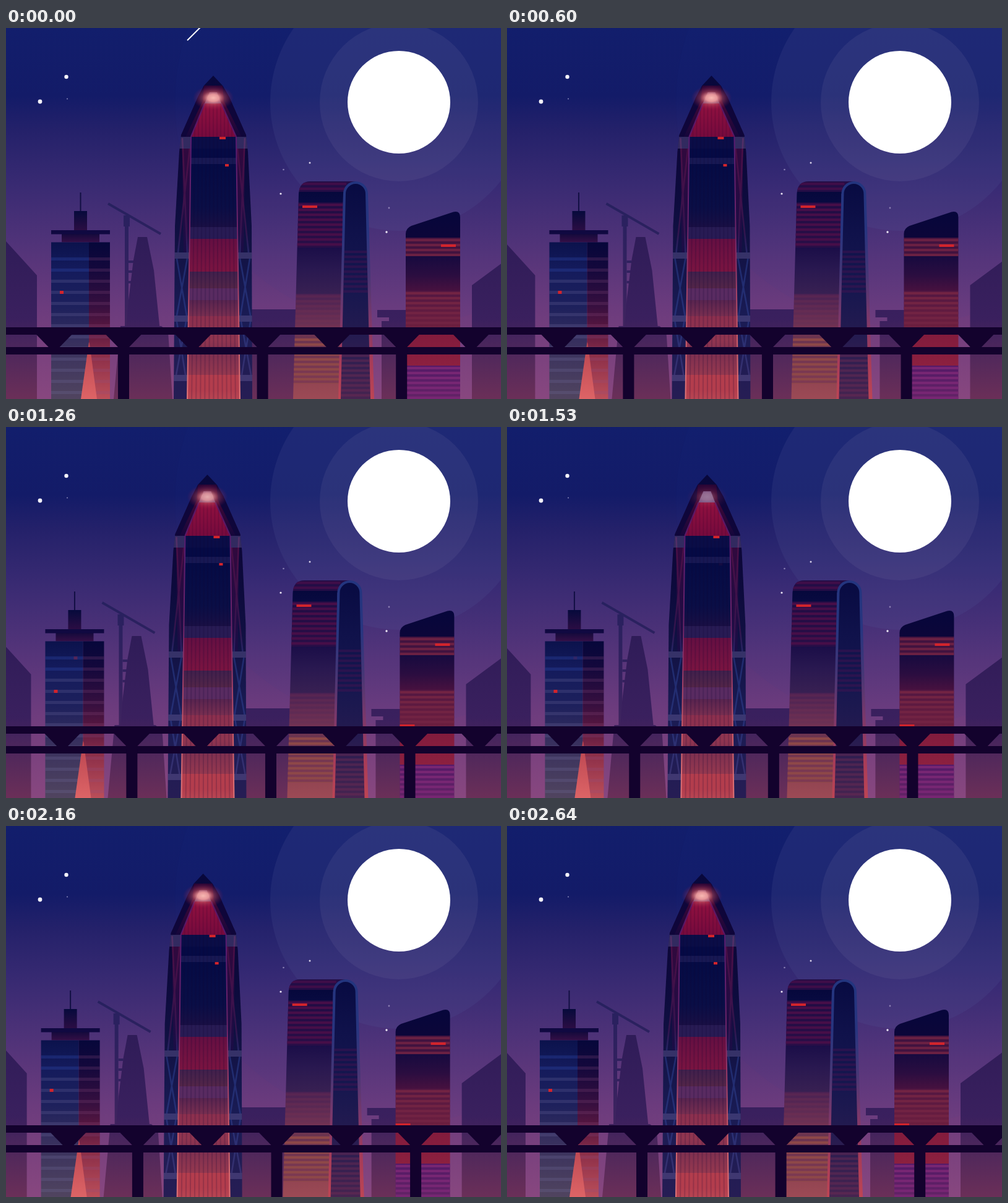
An HTML page with a canvas that plays this animation: 800 px wide and 600 px high, repeating every 2.71 s.

```html
<!DOCTYPE html>
<html lang="en">
<head>
<meta charset="utf-8">
<title>Night skyline</title>
<style>
html, body { margin: 0; width: 100%; height: 100%; overflow: hidden; background: #121d6a; }
canvas { display: block; width: 800px; height: 600px; }
</style>
</head>
<body>
<canvas id="stage" width="800" height="600"></canvas>
<script>
const c = document.getElementById('stage').getContext('2d');
const LOOP = 2710, STEP = 30, LAST = 2640;
const RED = '#d2242c', BRIDGE = '#13022d';

// Vertical gradient from [y, colour] pairs; a repeated y makes a hard edge.
function vg(...s) {
  const y0 = s[0], h = s[s.length - 2] - y0;
  const g = c.createLinearGradient(0, y0, 0, y0 + h);
  for (let i = 0; i < s.length; i += 2) g.addColorStop((s[i] - y0) / h, s[i + 1]);
  return g;
}
function rect(x, y, w, h, fill) {
  c.fillStyle = fill;
  c.fillRect(x, y, w, h);
}
function disc(x, y, r, fill) {
  c.fillStyle = fill;
  c.beginPath();
  c.arc(x, y, r, 0, 7);
  c.fill();
}
function shape(d, fill) {
  c.fillStyle = fill;
  c.fill(new Path2D(d));
}
function line(d, width, stroke) {
  c.lineWidth = width;
  c.strokeStyle = stroke;
  c.stroke(new Path2D(d));
}
function clipped(d, draw) {
  c.save();
  c.clip(new Path2D(d));
  draw();
  c.restore();
}
function stripes(x, w, y0, y1, gap, h, fill) {
  for (let y = y0; y < y1; y += gap) rect(x, y, w, Math.min(h, y1 - y), fill);
}
// Linear interpolation through [time, value] pairs.
function at(t, k) {
  if (t <= k[0]) return k[1];
  for (let i = 2; i < k.length; i += 2)
    if (t < k[i]) return k[i - 1] + (k[i + 1] - k[i - 1]) * (t - k[i - 2]) / (k[i] - k[i - 2]);
  return k[k.length - 1];
}

function sky() {
  rect(0, 0, 800, 600, vg(0, '#121e6c', 110, '#131b68', 165, '#24216a', 250, '#382a72',
    340, '#4e3278', 450, '#6b3b7d', 600, '#88477f'));
  disc(635, 120, 362, 'rgba(40,50,150,.04)');
  disc(635, 120, 208, 'rgba(80,85,150,.19)');
  disc(635, 120, 128, 'rgba(130,125,170,.13)');
  disc(635, 120, 83, '#fff');
  disc(97.5, 79, 3.2, '#f4f2fa');
  disc(55, 119, 3.4, '#f4f2fa');
  disc(99, 114.5, 1.1, '#7f7fb4');
  disc(491, 218, 1.5, '#d8d0e8');
  disc(448.5, 229, 1.3, '#8780b4');
  disc(444, 268, 1.6, '#eee8f6');
  disc(619, 291, 1.4, '#8a7eb2');
  disc(615, 330, 1.7, '#eee8f6');
}

function meteor(t) {
  if (t >= 540) return;
  const head = 21 + 190 * Math.min(1, t / 400), tail = at(t, [0, 0, 120, 0, 540, 211]);
  line(`M${314 - tail} ${tail - 1}L${314 - head} ${head - 1}`, 2, '#fff');
}

function farBlocks() {
  const far = vg(340, '#2f1c58', 470, '#3a205e', 520, '#4d275c', 600, '#6b2f58');
  shape('M-10 334L50 400V600H-10Z', far);
  shape('M753 416L830 359V600H753Z', far);
  shape('M380 455H480V600H380Z', far);
  shape('M600 456H650V600H607V474H619V468H600Z', far);
  const crane = vg(284, '#27215f', 400, '#33215f', 500, '#42255f');
  line('M165 284L250 333', 4, crane);
  rect(190, 303, 10, 18, crane);
  rect(192, 303, 6, 190, crane);
  for (const y of [376, 392, 409]) rect(198, y, 8, 4, crane);
  shape('M213 338H228L239 392L249 490H194L198 440L206 375Z', far);
  shape('M185 482H251L262 491L269 600H174Z', far);
}

function slabTower() {
  rect(119.5, 266, 2, 31, '#120f43');
  rect(110, 296, 21, 31, vg(296, '#060a3c', 327, '#2b0d43'));
  rect(90, 333, 61, 13.5, vg(333, '#140a3c', 346, '#330e45'));
  rect(73, 327, 95, 6.5, '#100941');
  rect(73, 346.5, 61, 254, vg(346, '#0b124c', 390, '#141b5c', 450, '#1d205c', 510, '#38305e', 600, '#50445f'));
  rect(134, 346.5, 34, 254, vg(346, '#06073a', 390, '#14083c', 450, '#370f3f', 490, '#5c1840',
    530, '#8c2f49', 600, '#bb4e59'));
  for (let y = 371; y < 600; y += 18) {
    rect(73, y, 61, 5, y < 400 ? 'rgba(44,66,160,.35)' : 'rgba(120,115,165,.22)');
    rect(134, y, 34, 5, 'rgba(140,80,130,.22)');
  }
  shape('M134 508L121 600H147L135 510Z', vg(508, '#b8434f', 600, '#dd6466'));
}

function cornerTower(t) {
  const body = 'M335 77L350 93L361 112L388 173L391 200L397 320L398 600H271L273 320L280 200L283 173L310 112L320 93Z';
  const core = 'M299 176H372L378 600H293Z';
  shape(body, vg(77, '#08083c', 176, '#0d0637', 260, '#0c0a3c', 360, '#121244', 460, '#191b54', 600, '#261d54'));
  clipped(body, () => {
    // crown
    shape('M320 93H350L360 116L388 176H283L310 116Z', vg(93, '#260535', 125, '#3c0736', 176, '#14073c'));
    shape('M320 93L310 112L283 173V176H290L318 118Z', '#0f063a');
    shape('M350 93L361 112L388 173V176H381L352 118Z', '#0f063a');
    shape('M321 122H348L372 176H299Z', vg(122, '#91103f', 176, '#760a3d'));
    line('M321 122L299 176M348 122L372 176', 2, '#5b1868');
    shape('M329 104H341L348 122H321Z', '#6d578c');
    // side bays
    shape('M285 195H299L294 363H287Z', vg(195, '#30093e', 363, '#1a0d46'));
    shape('M372 195H386L384 363H377Z', vg(195, '#30093e', 363, '#1a0d46'));
    const brace = vg(176, '#5b1148', 330, '#431753', 375, '#263782', 480, '#2d3a86', 600, '#4b3a78');
    c.globalAlpha = .65;
    line('M285 178L293 363M297 195L278 363M276 373L292 465M293 373L276 465M276 475L290 561M291 475L275 561', 2.6, brace);
    line('M386 178L378 363M374 195L392 363M394 373L379 465M378 373L395 465M395 475L381 561M380 475L396 561', 2.6, brace);
    c.globalAlpha = 1;
    for (const [y, h] of [[176, 19], [363, 10], [465, 10], [561, 10]])
      rect(268, y, 134, h, 'rgba(112,100,160,.38)');
  });
  shape(core, vg(176, '#0a0d47', 195, '#0a0d47', 195, '#050a45', 210, '#050a45', 210, '#171853',
    220, '#171853', 220, '#050b45', 290, '#0a0e46', 322, '#190f44', 322, '#281b54', 341, '#281b54',
    341, '#650f42', 394, '#7a1441', 394, '#40204c', 421, '#532548', 421, '#592b61', 440, '#592b61',
    440, '#58244f', 466, '#782e50', 466, '#8c2f4e', 505, '#903550', 528, '#7f3050',
    561, '#95384f', 561, '#b33d4d', 585, '#b33d4d', 600, '#b84553'));
  let pins = '';
  for (let i = 1; i < 12; i++) pins += `M${299 + 73 * i / 12} 176L${293 + 85 * i / 12} 600`;
  line(pins, 2, 'rgba(20,8,50,.18)');
  clipped('M321 122H348L372 176H299Z', () => {
    let p = '';
    for (let x = 305; x < 372; x += 6) p += `M${x} 122V176`;
    line(p, 1.6, 'rgba(50,0,45,.22)');
  });
  line('M299 176L293 600M372 176L378 600', 2,
    vg(176, '#561a70', 330, '#702468', 420, '#a04066', 490, '#c85a66', 600, '#e07476'));

  // beacon
  c.save();
  c.globalAlpha = at(t, [1200, 1, 1500, .32, 1560, .32, 1920, 1]);
  c.translate(335, 113);
  c.scale(1, .62);
  const g = c.createRadialGradient(0, 0, 0, 0, 0, 33);
  g.addColorStop(0, '#f8b8b2');
  g.addColorStop(.28, 'rgba(240,155,155,.92)');
  g.addColorStop(.55, 'rgba(195,80,95,.5)');
  g.addColorStop(1, 'rgba(150,20,70,0)');
  disc(0, 0, 33, g);
  c.restore();
}

function archTower() {
  const block = 'M473 268Q474 248 492 248H566V268H545L540 600H464Z';
  shape(block, vg(248, '#240d46', 265, '#240d46', 265, '#06083c', 282, '#080a40', 282, '#220c44',
    355, '#2a0e47', 355, '#1b0e48', 390, '#291850', 430, '#382052', 430, '#4a2153', 484, '#6e3254',
    500, '#6c344f', 575, '#7f3a52', 575, '#934552', 600, '#9c4a55'));
  clipped(block, () => {
    stripes(460, 90, 250, 265, 8, 4, '#3e0d48');
    stripes(460, 90, 284, 355, 8, 4, '#460e48');
    stripes(460, 90, 432, 484, 8, 4, 'rgba(130,50,80,.2)');
    stripes(460, 90, 502, 575, 8, 4, '#8d4748');
  });
  shape('M537 600L545 268A20 20 0 0 1 585 268L595 600Z',
    vg(248, '#23357f', 330, '#28357f', 400, '#463675', 470, '#7c386a', 540, '#a83c58', 600, '#bd4554'));
  const inner = 'M541 600L549 268A16 16 0 0 1 581 268L589 600Z';
  shape(inner, vg(252, '#080b42', 340, '#10124b', 430, '#18174f', 500, '#251b50', 600, '#472450'));
  clipped(inner, () => {
    stripes(538, 55, 360, 430, 8, 4, 'rgba(80,18,80,.36)');
    stripes(538, 55, 528, 600, 8, 4, 'rgba(120,45,85,.36)');
  });
}

function slopeTower() {
  const body = 'M646 600V333Q646 324 655 320L723 297.5Q734 295 734 306V600Z';
  shape(body, vg(296, '#06063b', 339, '#0c0639', 339, '#42133f', 369, '#42133f', 369, '#170a3f',
    400, '#2b0d40', 425, '#47113f', 425, '#531742', 484, '#6d1f3f', 484, '#801a3c',
    546, '#8c203f', 546, '#551a67', 600, '#632366'));
  clipped(body, () => {
    stripes(646, 88, 341, 369, 8, 4, '#6a2043');
    stripes(646, 88, 427, 484, 8, 4, '#712343');
    stripes(646, 88, 548, 600, 8, 4, '#772673');
  });
}

// x, y, width, height, brightness over time
const lights = [
  [345, 176, 10, 4, [900, 1, 990, .6, 1080, 1]],
  [354, 220, 6, 4, [1400, 1, 1530, .06, 1700, 1]],
  [306, 195, 6, 4, [880, 0, 990, .35, 1100, 0]],
  [87, 425, 6, 5, [900, 1, 990, .65, 1080, 1, 1750, 1, 1860, .25, 1970, 1]],
  [119, 371, 6, 5, [880, 0, 990, .5, 1530, .12, 1860, 1, 2060, 0]],
  [479, 287, 24, 4, [1750, 1, 1860, .25, 1970, 1]],
  [703, 350, 24, 4, [0, 1]],
  [646, 481, 24, 4, [700, 0, 900, 1]]
];
function blink(t) {
  for (const [x, y, w, h, keys] of lights) {
    c.globalAlpha = at(t, keys);
    rect(x, y, w, h, RED);
  }
  c.globalAlpha = 1;
}

function bridge() {
  rect(-60, 484, 900, 12, BRIDGE);
  rect(-60, 516, 900, 12, BRIDGE);
  for (let i = 0; i < 8; i++) {
    const x = 77.7 + 112.3 * i;
    shape(`M${x - 28.5} 496H${x + 28.5}L${x + 9} 516H${x - 9}Z`, BRIDGE);
    if (i % 2) rect(x - 9, 520, 18, 80, BRIDGE);
  }
}

function draw(t) {
  sky();
  meteor(t);
  c.save();
  c.translate(-20 * t / LAST, 0);
  farBlocks();
  slabTower();
  cornerTower(t);
  archTower();
  slopeTower();
  blink(t);
  c.restore();
  c.save();
  c.translate(28 * t / LAST, 0);
  bridge();
  c.restore();
}

const start = performance.now();
function tick() {
  const t = (performance.now() - start) % LOOP;
  draw(Math.min(LAST, Math.floor(t / STEP) * STEP));
  requestAnimationFrame(tick);
}
tick();
</script>
</body>
</html>
```
